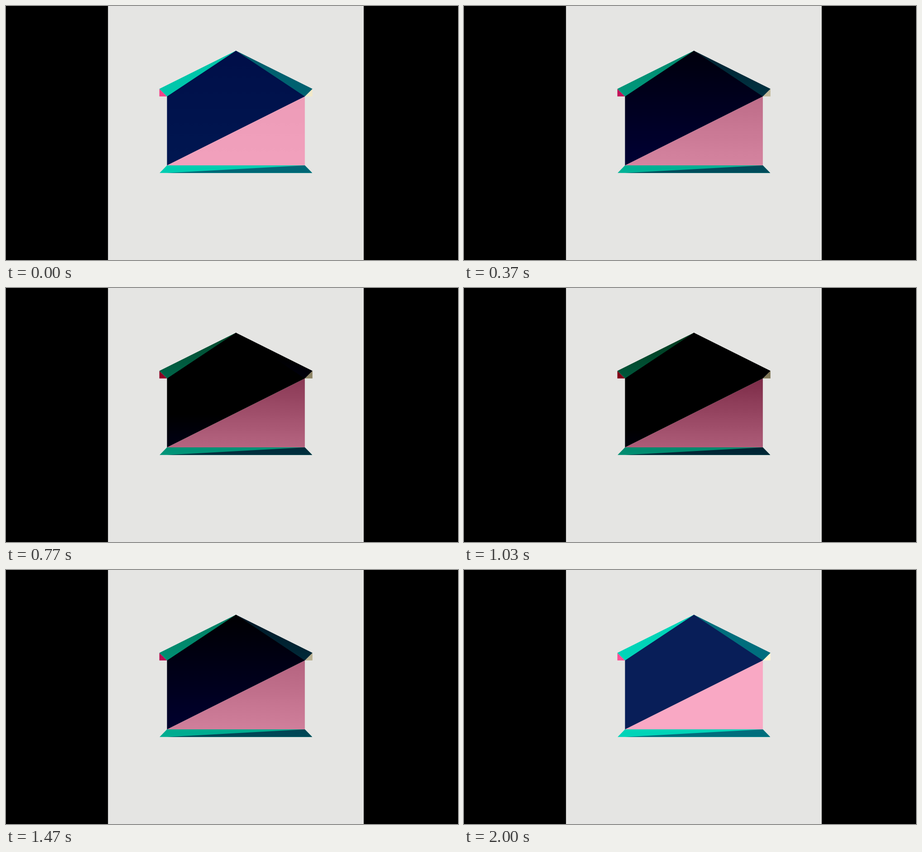
Write an HTML page with a canvas that moves like this. It is 998 px wide and 561 px high and loops after 2070 ms.

```html
<!DOCTYPE html>
<html lang="en">
<head>
<meta charset="utf-8">
<title>House at dusk</title>
<style>
html, body { margin: 0; height: 100%; overflow: hidden; background: #000; }
canvas { display: block; }
</style>
</head>
<body>
<canvas id="stage" width="998" height="561"></canvas>
<script>
const ctx = document.getElementById('stage').getContext('2d');
const LOOP = 2070, TOP = 95, BOTTOM = 370, STOPS = 24;
const green = [0, 212, 184], teal = [0, 110, 125], navy = [8, 30, 88];
const rose = [249, 168, 196], hotPink = [255, 80, 150], cream = [255, 246, 214];

const apex = [507.7, 98.7], eaveL = [338.6, 183.1], eaveR = [676.7, 183.1];
const wallL = [355.5, 199.7], wallR = [659.8, 199.7];
const floorL = [355.5, 352], floorR = [659.8, 352];
const baseL = [339.2, 368.8], baseR = [676.2, 368.8];

// Later faces cover the inner edges of earlier ones, so no seams show.
const faces = [
  [hotPink, eaveL, wallL, [eaveL[0], wallL[1]]],
  [cream, eaveR, wallR, [eaveR[0], wallR[1]]],
  [green, eaveL, apex, [apex[0], wallL[1]], wallL],
  [teal, eaveR, apex, [apex[0], wallR[1]], wallR],
  [green, floorL, floorR, baseR, baseL],
  [teal, floorR, baseR, [floorL[0], baseL[1]]],
  [rose, wallR, floorR, floorL],
  [navy, apex, wallR, floorL, wallL]
];

// Light is subtracted equally from each channel, more towards the top.
function shade(color, dark) {
  const fill = ctx.createLinearGradient(0, TOP, 0, BOTTOM);
  for (let i = 0; i <= STOPS; i++) {
    const y = TOP + (BOTTOM - TOP) * i / STOPS;
    const loss = dark * (1 - 0.0026 * (y - 200));
    const rgb = color.map(c => Math.max(0, Math.round(c - loss)));
    fill.addColorStop(i / STOPS, `rgb(${rgb})`);
  }
  return fill;
}

// Thirty steps a second, on a 10 ms clock; the last step is held.
function stepTime(t) {
  const part = t % 100;
  const step = 3 * Math.floor(t / 100) + (part >= 30) + (part >= 70);
  return Math.min(step, 60) * 100 / 3;
}

function draw(now) {
  const t = stepTime(now % LOOP);
  const dark = Math.max(0, 135 - 0.129 * Math.abs(t - 951));
  ctx.fillStyle = '#000';
  ctx.fillRect(0, 0, 998, 561);
  ctx.fillStyle = '#e5e5e3';
  ctx.fillRect(225.2, 0, 564.6, 561);
  for (const [color, ...points] of faces) {
    ctx.beginPath();
    for (const [x, y] of points) ctx.lineTo(x, y);
    ctx.fillStyle = shade(color, dark);
    ctx.fill();
  }
}

const start = performance.now();
function tick() {
  draw(performance.now() - start);
  requestAnimationFrame(tick);
}
tick();
</script>
</body>
</html>
```
